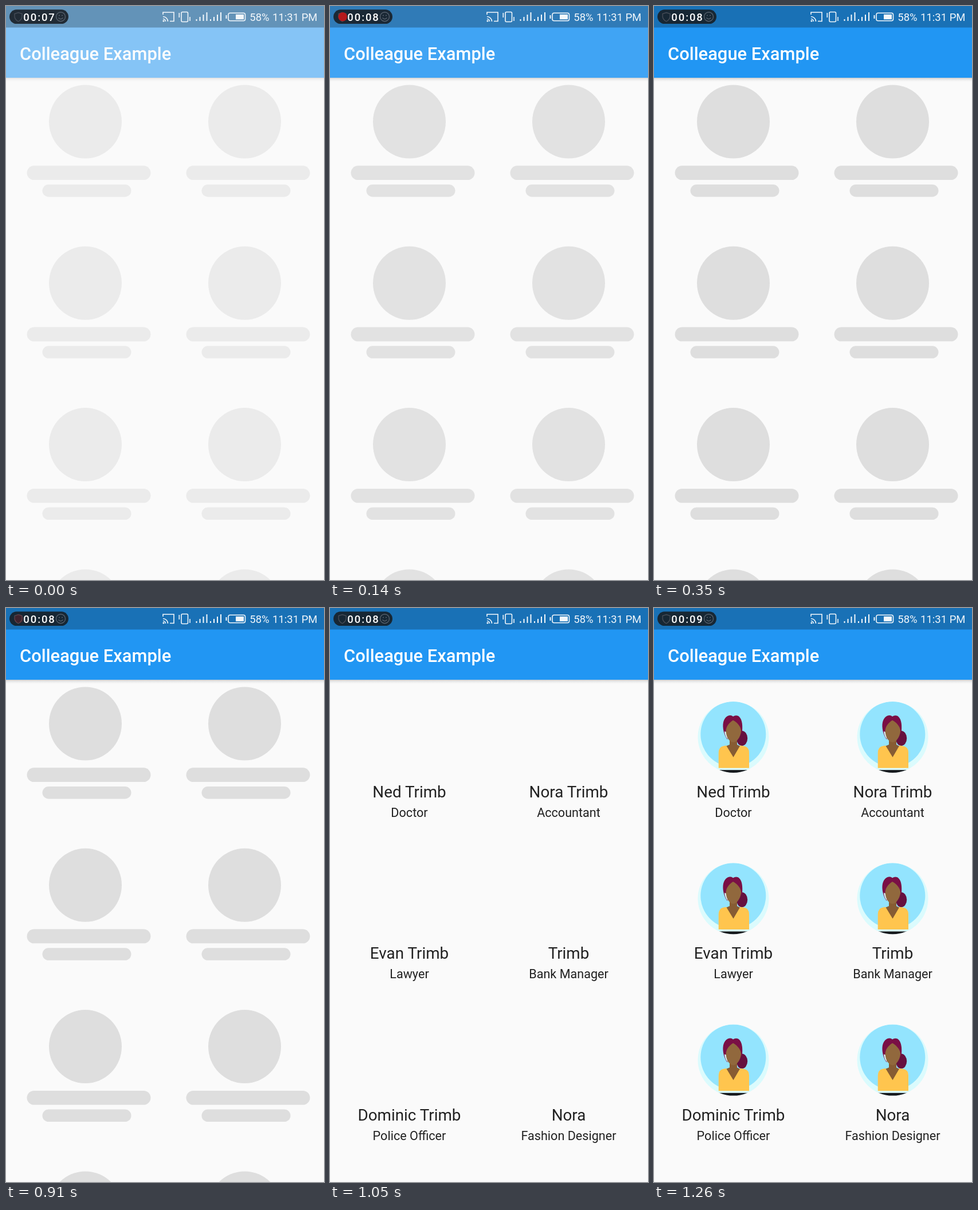
Recreate the animation shown at these times as an HTML page. Size 555x1000 px, loop 1330 ms.

```html
<!DOCTYPE html>
<html lang="en">
<head>
<meta charset="utf-8">
<title>Colleague Example</title>
<style>
  html, body { margin: 0; width: 100%; height: 100%; overflow: hidden; background: #fafafa; }
  svg { display: block; width: 555px; height: 1000px; font-family: Roboto, sans-serif; }
  .line { fill: none; stroke: #f2f7fb; stroke-width: 1.6; }
  .name { font-size: 27.8px; }
  .job { font-size: 21.6px; }
  #people text { fill: #212121; text-anchor: middle; }
</style>
</head>
<body>
<svg viewBox="0 0 555 1000">
  <defs>
    <linearGradient id="shade" x2="0" y2="1">
      <stop offset="0" stop-color="#000" stop-opacity=".18"/>
      <stop offset=".45" stop-color="#000" stop-opacity=".06"/>
      <stop offset="1" stop-color="#000" stop-opacity="0"/>
    </linearGradient>
    <clipPath id="round"><circle cx="138.5" cy="225" r="62"/></clipPath>
    <g id="bones">
      <ellipse cx="138.5" cy="201.5" rx="63.5" ry="64"/>
      <rect x="36.5" y="278.3" width="216" height="24.7" rx="12.3"/>
      <rect x="63.5" y="311" width="155" height="21.5" rx="10.7"/>
    </g>
    <g id="avatar" clip-path="url(#round)">
      <rect x="76" y="162" width="125" height="126" fill="#dbfbfd"/>
      <circle cx="138.3" cy="220" r="57" fill="#93e4fe"/>
      <rect x="76" y="278.7" width="125" height="4" fill="#dbfbfd"/>
      <rect x="76" y="282.2" width="125" height="6" fill="#16191d"/>
      <ellipse cx="153.5" cy="227" rx="9.7" ry="13" fill="#66113f"/>
      <path d="M128 229C122 221 119 208 121 199C123 191 128 187 133 187Q136 187 138 189Q142 186 147 188C153 192 155 201 154 214L148 226H130Z" fill="#7a0f45"/>
      <path d="M123 215Q124 224 129 229L126.5 216Z" fill="#dbfbfd"/>
      <path d="M132 225H145V238L151 241L138.5 261L125 241L132 238Z" fill="#875c33"/>
      <path d="M138 195.5C146 200 152 207 152 215C151 225 144 234 138.5 234C132 234 125.5 225 125.5 214C126 206 131 200 138 195.5Z" fill="#91683d"/>
      <path d="M112.7 278.7V252Q113 242 121 240.5L126 239.5L138.5 260L150.5 239.5L157 240.5Q166 242 166 252V278.7Z" fill="#ffc54e"/>
    </g>
  </defs>

  <rect width="555" height="1000" fill="#fafafa"/>
  <g id="page">
    <g id="skeleton" fill="#dedede"></g>
    <g id="people"></g>
    <g id="faces"></g>
    <rect y="125" width="555" height="7" fill="url(#shade)"/>
    <rect width="555" height="125" fill="#2196f3"/>
    <text x="24" y="93.8" font-size="30.9" font-weight="500" fill="#fff">Colleague Example</text>
  </g>

  <rect width="555" height="37.5" fill="#000" opacity=".25"/>
  <g id="status" fill="#f2f7fb">
    <path class="line" d="M274 15V11H293V26.5H286"/>
    <path class="line" d="M274 18.5A8.5 8.5 0 0 1 282.5 27M274 22.5A4.5 4.5 0 0 1 278.5 27"/>
    <circle cx="275" cy="26" r="1.6"/>
    <rect class="line" x="306" y="10.5" width="11.5" height="17" rx="2"/>
    <path class="line" d="M302.3 12V20M321 19V26"/>
    <g id="bars"></g>
    <rect class="line" x="388" y="12.3" width="29.5" height="13.4" rx="3"/>
    <rect x="383.5" y="16" width="2" height="6"/>
    <rect x="401" y="14.7" width="14" height="8.6"/>
    <text x="425.3" y="26" font-size="18.5">58%</text>
    <text x="465" y="26" font-size="18.5">11:31 PM</text>
  </g>

  <g id="recorder">
    <rect x="6" y="6.3" width="103" height="24.7" rx="12.3" fill="#181c22" fill-opacity=".87"/>
    <path d="M21.5 11.5L28 13.5V19Q27 24 21.5 27Q16 24 15 19V13.5Z" fill="none" stroke="#454c57" stroke-width="1.4"/>
    <g fill="none" stroke="#56606c" stroke-width="1.4">
      <circle cx="95.5" cy="18.7" r="8"/>
      <path d="M91.5 20.5Q95.5 25 99.5 20.5M92 16.5H94M97 16.5H99"/>
    </g>
    <circle id="dot" cx="22.2" cy="18.7" r="7.8" fill="#b4191b"/>
    <text id="clock" x="30.3" y="26" font-size="18.5" font-weight="500" letter-spacing="1.9" fill="#fff"></text>
  </g>
</svg>
<script>
  const LOOP = 1330, STEP = 70, COL = 278, ROW = 281.3;
  const el = id => document.getElementById(id);
  const staff = [
    ["Ned Trimb", "Doctor"], ["Nora Trimb", "Accountant"],
    ["Evan Trimb", "Lawyer"], ["Trimb", "Bank Manager"],
    ["Dominic Trimb", "Police Officer"], ["Nora", "Fashion Designer"]
  ];
  const use = (id, i) => `<use href="#${id}" x="${i % 2 * COL}" y="${(i >> 1) * ROW}"/>`;
  const label = ([name, job], i) => {
    const x = 138.5 + i % 2 * COL, y = (i >> 1) * ROW;
    return `<text class="name" x="${x}" y="${y + 330}">${name}</text>` +
           `<text class="job" x="${x}" y="${y + 364}">${job}</text>`;
  };
  const bar = (x, i) => {
    const h = 3 + i * 4;
    return `<rect x="${x + i * 6}" y="${26 - h}" width="2" height="${h}"/>`;
  };

  el("skeleton").innerHTML = [...Array(8).keys()].map(i => use("bones", i)).join("");
  el("people").innerHTML = staff.map(label).join("");
  el("faces").innerHTML = staff.map((_, i) => use("avatar", i)).join("");
  el("bars").innerHTML = [331.5, 356].map(x => [0, 1, 2, 3].map(i => bar(x, i)).join("")).join("");

  const show = (id, on) => el(id).setAttribute("visibility", on ? "visible" : "hidden");
  const fade = [0.54, 0.69, 0.86, 0.95, 0.985];

  function dotAlpha(t) {
    if (t >= 70 && t < 280) return 1;
    if (t >= 280 && t < 350) return 0.4;
    return t >= 910 && t < 980 ? 0.25 : 0;
  }

  function draw(ms) {
    const n = Math.floor(ms % LOOP / STEP), t = n * STEP;
    el("page").setAttribute("opacity", fade[n] ?? 1);
    show("skeleton", t < 1050);
    show("people", t >= 1050);
    show("faces", t >= 1190);
    el("dot").setAttribute("opacity", dotAlpha(t));
    el("clock").textContent = "00:0" + (t < 70 ? 7 : t < 1190 ? 8 : 9);
  }

  const start = performance.now();
  function tick() {
    draw(performance.now() - start);
    requestAnimationFrame(tick);
  }
  tick();
</script>
</body>
</html>
```
